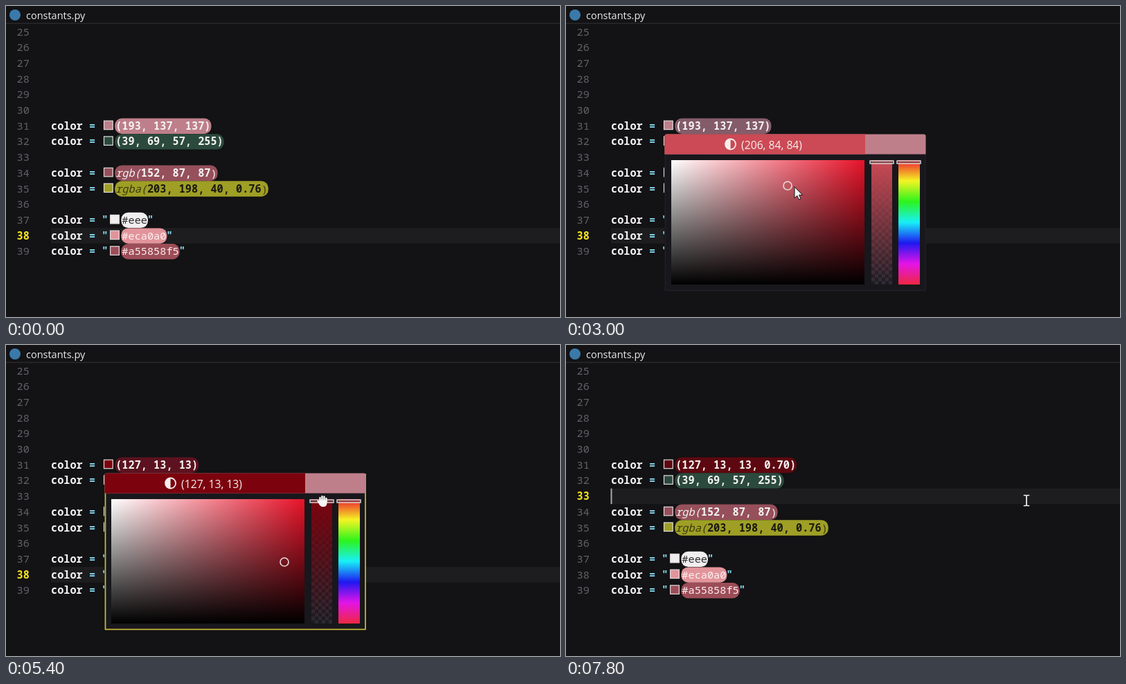
Animation, 800 px wide and 450 px high, one loop 8 s. Source, as an HTML page with a canvas:

```html
<!DOCTYPE html>
<html lang="en">
<head>
<meta charset="utf-8">
<title>Color picker in an editor</title>
<style>
  html, body { margin: 0; width: 100%; height: 100%; overflow: hidden; background: #131214; }
  canvas { display: block; }
</style>
</head>
<body>
<canvas id="stage" width="800" height="450"></canvas>
<script>
const ctx = document.getElementById('stage').getContext('2d');
const LOOP = 8000, STEP = 200;
const BG = '#131214', WHITE = '#f4f2f2', CYAN = '#80d4ea';
const MONO = '15.25px "Noto Sans Mono", monospace';
const BOLD = 'bold ' + MONO;
const SANS = '"Open Sans", "Noto Sans", sans-serif';
const FIELD = { x: 152, y: 223, w: 279, h: 180 };
const START = [193, 137, 137];
const HUES = ['#ee1c30', '#f4f424', '#2cf41c', '#18f0f8', '#1e18f0', '#e414e8', '#ee2840'];

// Keyframes: time, then values
const ringKeys = [[2600, 233, 267], [2800, 280, 240], [3000, 320, 260], [3400, 338, 298],
  [3600, 334, 319], [3800, 334, 319], [4200, 381, 273], [4400, 402, 314]];
const alphaKeys = [[5400, 1], [5800, 0.82], [6200, 0.72], [6600, 0.7]];
const mouseKeys = [[600, 262, -10], [1200, 241, 176], [2000, 241, 176], [2400, 236, 258],
  [2600, 235, 267], [2800, 290, 242], [3000, 330, 262], [3400, 345, 300], [3600, 336, 319],
  [3800, 348, 316], [4200, 385, 276], [4400, 402, 314], [4800, 402, 314], [5200, 456, 226],
  [5400, 457, 226], [5800, 457, 257], [6200, 458, 275], [6600, 458, 278], [7200, 458, 278],
  [7400, 575, 246], [7600, 665, 225]];

function track(keys, t) {
  const next = keys.findIndex(k => k[0] > t);
  if (next === 0) return keys[0].slice(1);
  if (next < 0) return keys[keys.length - 1].slice(1);
  const a = keys[next - 1], b = keys[next], p = (t - a[0]) / (b[0] - a[0]);
  return a.slice(1).map((v, i) => v + (b[i + 1] - v) * p);
}

function colorAt(t) {
  if (t < 2600) return START;
  const [x, y] = track(ringKeys, t);
  const value = 255 * (1 - (y - 224) / 179);
  const other = Math.round(value * (1 - (x - 152) / 279));
  return [Math.round(value), other, other];
}

const rgb = c => `rgb(${c.map(Math.round).join(',')})`;
const mix = (a, b, p) => a.map((v, i) => v + (b[i] - v) * p);
// Colors on screen are slightly cooler than their written values
const shade = ([r, g, b]) => [r - 3, Math.max(0, g - 10), b + 1];
const onBackground = (c, alpha) => mix([19, 18, 20], shade(c), alpha);
const label = (c, alpha) => `(${c.join(', ')}${alpha < 1 ? ', ' + alpha.toFixed(2) : ''})`;
const lineY = n => 37 + (n - 25) * 22.7;

function rect(x, y, w, h, fill) {
  ctx.fillStyle = fill;
  ctx.fillRect(x, y, w, h);
}

function rounded(x, y, w, h, r, fill) {
  ctx.beginPath();
  ctx.roundRect(x, y, w, h, r);
  ctx.fillStyle = fill;
  ctx.fill();
}

function outline(x, y, w, h, color, width) {
  ctx.strokeStyle = color;
  ctx.lineWidth = width;
  ctx.strokeRect(x, y, w, h);
}

function gradient(x0, y0, x1, y1, colors) {
  const g = ctx.createLinearGradient(x0, y0, x1, y1);
  colors.forEach((c, i) => g.addColorStop(i / (colors.length - 1), c));
  return g;
}

// Draws text and returns the x where it ends
function text(str, x, y, color, font) {
  ctx.font = font;
  ctx.fillStyle = color;
  ctx.fillText(str, x, y);
  return x + ctx.measureText(str).width;
}

function colorLine(n, value, fill, { ink = WHITE, faint = ink, swatch = fill, quoted = false } = {}) {
  const y = lineY(n), base = y + 5.5;
  let x = text('color ', 65, base, WHITE, BOLD);
  x = text('= ', x, base, CYAN, BOLD);
  if (quoted) x = text('"', x, base, CYAN, BOLD);
  rect(x + 3, y - 7, 13, 12.5, swatch);
  outline(x + 3.3, y - 7, 12.7, 12.5, '#e2dcdc', 1.2);
  x += 20;

  const [, name, body, close] = value.match(/^(rgba?\()?(.*?)(\)?)$/);
  ctx.font = BOLD;
  rounded(x - 1, y - 10.7, ctx.measureText(value).width + 2, 22.4, 10, fill);
  if (quoted) {
    x = text(value, x, base, ink, MONO);
    text('"', x, base, CYAN, BOLD);
  } else {
    if (name) x = text(name, x, base, faint, 'italic ' + MONO);
    x = text(body, x, base, ink, BOLD);
    text(close, x, base, faint, name ? MONO : BOLD);
  }
}

function editor(t, open) {
  rect(0, 0, 800, 450, BG);
  rect(0, 24.5, 800, 1.5, '#29282b');
  ctx.beginPath();
  ctx.arc(13, 13, 8, 0, 7);
  ctx.fillStyle = '#3a79a9';
  ctx.fill();
  text('constants.py', 29, 18.8, '#ececec', '14.5px ' + SANS);

  const active = t < 7600 ? 38 : 33;
  rect(65, lineY(active) - 11, 735, 22.6, '#1d1d1f');
  for (let n = 25; n <= 39; n++) {
    const on = n === active;
    text(n, 15.5, lineY(n) + 5.5, on ? '#f4e21c' : '#626166', on ? BOLD : MONO);
  }
  if (active === 33) rect(64.5, lineY(33) - 11, 2, 22.5, '#a9a9a9');

  // The code follows the picker only after short pauses
  const sample = t < 3600 ? 0 : t < 4200 ? 3700 : t < 4800 ? 4200 : 4600;
  const color = colorAt(sample), [alpha] = track(alphaKeys, t);
  const solid = onBackground(color, alpha);
  const fill = open ? mix(solid, [45, 40, 56], 0.4) : solid;
  colorLine(31, label(color, alpha), rgb(fill), { swatch: rgb(t < 5000 ? shade(START) : solid) });
  colorLine(32, '(39, 69, 57, 255)', '#2b4a3d');
  colorLine(34, 'rgb(152, 87, 87)', '#95505b');
  colorLine(35, 'rgba(203, 198, 40, 0.76)', '#9f9f26', { ink: '#1b1a10', faint: '#3a390e' });
  colorLine(37, '#eee', '#f0eeee', { ink: '#2c2a2c', quoted: true });
  colorLine(38, '#eca0a0', '#e2949b', { ink: '#fcf0f0', quoted: true });
  colorLine(39, '#a55858f5', '#9c4d58', { ink: '#fcf0f0', quoted: true });
}

function handle(x, y) {
  rect(x, y - 2, 34, 4, 'rgba(90,70,76,.6)');
  outline(x, y - 2, 34, 4, '#e4dada', 1.4);
}

function header(color, alpha) {
  rounded(142.5, 185.5, 377, 29, [3, 3, 0, 0], rgb(shade(START)));
  rounded(142.5, 185.5, 289.5, 29, [3, 0, 0, 0], rgb(onBackground(color, alpha)));
  const str = label(color, alpha), font = '15.7px ' + SANS;
  const ink = color[1] > 120 ? '#181418' : '#f6eeee';
  ctx.font = font;
  const left = 285 - (ctx.measureText(str).width + 24) / 2;
  text(str, left + 24, 206.5, ink, font);
  ctx.beginPath();
  ctx.arc(left + 8.5, 200, 7.5, 0, 7);
  ctx.strokeStyle = ink;
  ctx.lineWidth = 1.8;
  ctx.stroke();
  ctx.beginPath();
  ctx.arc(left + 8.5, 200, 7.5, Math.PI / 2, Math.PI * 1.5);
  ctx.fill();
}

function picker(t) {
  const color = colorAt(t - 15), [alpha] = track(alphaKeys, t);
  const { x, y, w, h } = FIELD;
  rounded(142, 186, 378, 227, 3, '#18171c');
  outline(143.5, 187, 375.5, 224.5, t < 3200 ? '#222128' : '#c9bb38', t < 3200 ? 1 : 1.7);
  header(color, alpha);

  rect(x, y, w, h, gradient(x, 0, x + w, 0, ['#fff', '#e81228']));
  rect(x, y, w, h, gradient(0, y, 0, y + h, ['rgba(0,0,0,0)', '#000']));

  rect(441, y, 30, h, '#1c1b22');
  for (let row = 0; row < 36; row++)
    for (let col = row % 2; col < 6; col += 2)
      rect(441 + col * 5, y + row * 5, 5, 5, '#2b2a33');
  const channels = shade(color).join(',');
  rect(441, y, 30, h, gradient(0, y, 0, y + h, [`rgb(${channels})`, `rgba(${channels},0)`]));
  rect(480, y, 31, h, gradient(0, y, 0, y + h, HUES));
  handle(439, 226 + Math.max(0, (1 - alpha) * 179 - 1));
  handle(478, 226);

  const [ringX, ringY] = track(ringKeys, t);
  ctx.beginPath();
  ctx.arc(ringX, ringY, 6, 0, 7);
  ctx.strokeStyle = '#e8dcdc';
  ctx.lineWidth = 1.6;
  ctx.stroke();
}

// Composites the half-visible popup as one layer
function fadeIn(t) {
  const under = document.createElement('canvas');
  under.width = 800;
  under.height = 450;
  under.getContext('2d').drawImage(ctx.canvas, 0, 0);
  picker(t);
  ctx.globalAlpha = 0.4;
  ctx.drawImage(under, 0, 0);
  ctx.globalAlpha = 1;
}

const arrow = new Path2D('M0 0V16L3.8 12.4L6.4 18L9 16.8L6.5 11.4H11.2Z');
const beam = new Path2D('M-3.5 -7.5H-1L0 -6.5L1 -7.5H3.5M0 -6.5V6.5M-3.5 7.5H-1L0 6.5L1 7.5H3.5');
const fingers = new Path2D('M-3.5 1V-5M-0.5 0V-7M2.5 0V-6.5M5.5 1V-4M-6.5 0L-3 4');
const palm = new Path2D('M-5 -1H6.5V3Q6 8 2 8H-1Q-4 7 -6 2Z');

function mouse(t) {
  if (t < 600) return;
  const [x, y] = track(mouseKeys, t);
  ctx.save();
  ctx.translate(x, y);
  ctx.lineCap = ctx.lineJoin = 'round';
  ctx.strokeStyle = ctx.fillStyle = '#f6f6f6';
  if (t < 2200 || t >= 7400) {
    ctx.lineWidth = 1.7;
    ctx.stroke(beam);
  } else if (t < 5200) {
    ctx.strokeStyle = '#18181a';
    ctx.lineWidth = 1;
    ctx.fill(arrow);
    ctx.stroke(arrow);
  } else {
    ctx.lineWidth = 2.4;
    ctx.stroke(fingers);
    ctx.fill(palm);
  }
  ctx.restore();
}

function frame(now) {
  const t = Math.floor((now % LOOP) / STEP) * STEP;
  const open = t >= 2000 && t < 7600;
  editor(t, open);
  if (t === 2000) fadeIn(t);
  else if (open) picker(t);
  mouse(t);
  requestAnimationFrame(frame);
}

requestAnimationFrame(frame);
</script>
</body>
</html>
```
